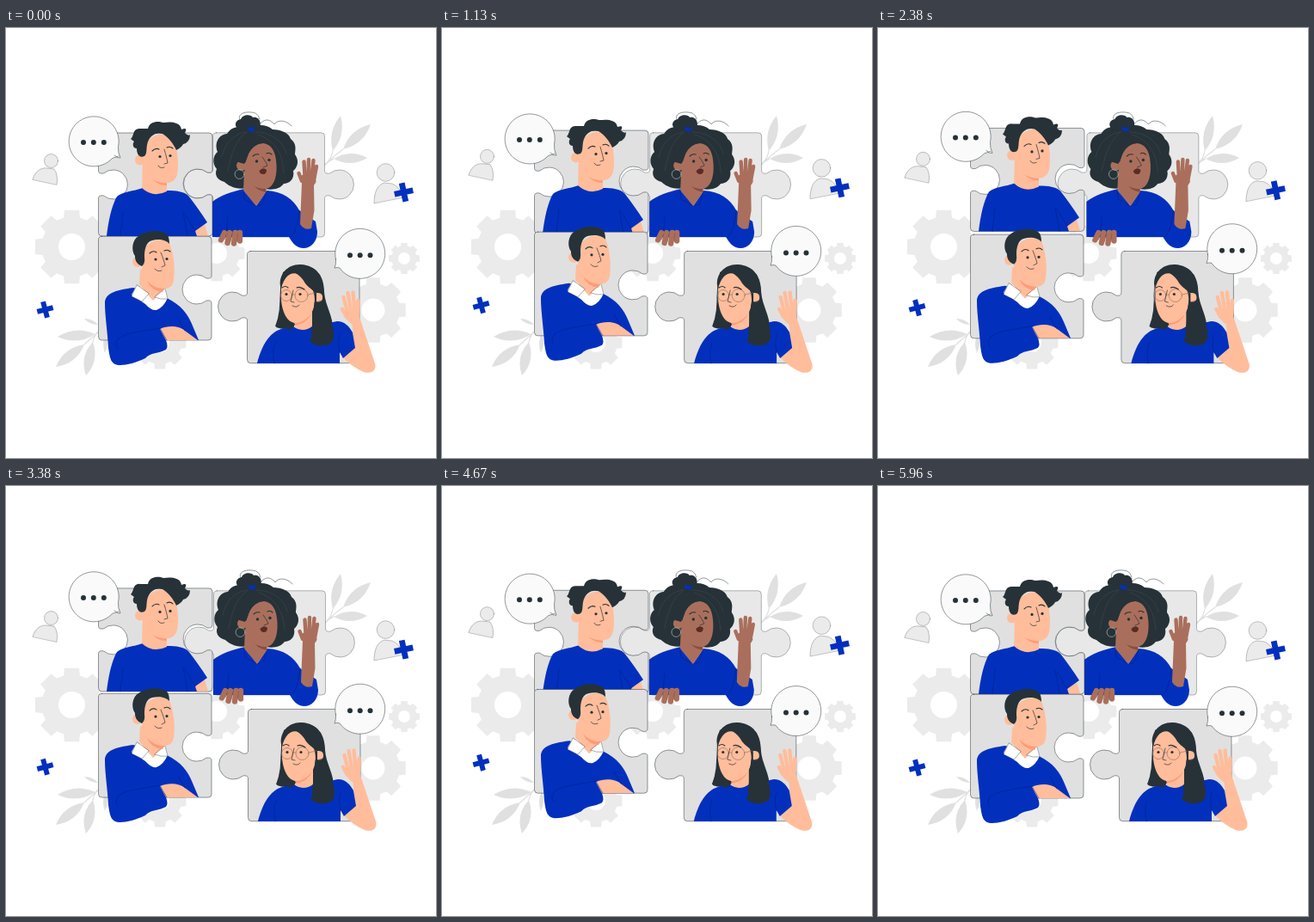
These frames come from a looping animation (500 by 500 pixels, 6 s). An HTML page:

```html
<!DOCTYPE html>
<html lang="en">
<head>
<meta charset="utf-8">
<title>Team puzzle</title>
<style>
html, body { margin: 0; width: 100%; height: 100%; overflow: hidden; background: #fff; }
svg { display: block; width: 100%; height: 100%; }
path, circle { stroke-linecap: round; stroke-linejoin: round; }
.pale { fill: #ebebeb; }
.piece { fill: #e0e0e0; stroke: #263238; stroke-width: .5; }
.light { fill: #e8e8e8; stroke-width: .35; }
.user { fill: #ebebeb; stroke: #555; stroke-width: .35; }
.bubble { fill: #fafafa; stroke: #263238; stroke-width: .5; }
.blue { fill: #0230bd; }
.plus { stroke: #0230bd; stroke-linecap: butt; }
.dark { fill: #263238; }
.skin { fill: #ffbd9b; }
.shade { fill: #ff9b78; }
.brown { fill: #aa6f5c; }
.brownShade { fill: #854f40; }
.line { fill: none; stroke: #263238; stroke-width: .7; }
.thin { stroke-width: .5; }
.brow { fill: none; stroke: #263238; stroke-width: 1.1; }
.fold { fill: none; stroke: #001c80; stroke-width: .5; }
.strand { fill: none; stroke: #47555b; stroke-width: .4; }
.fingers { fill: none; stroke: #ffbd9b; stroke-width: 4.4; }
.fingers.tan { stroke: #aa6f5c; }
.white { fill: #fff; stroke: #263238; stroke-width: .4; }
</style>
</head>
<body>
<svg viewBox="0 0 500 500">
  <g id="back" class="pale"></g>

  <g data-move="slow">
    <g class="user">
      <path d="M31 176C34 166 41 162 48 163L56 164Q61 171 59 182Z"/>
      <circle cx="52.500" cy="154.500" r="8"/>
      <path d="M428 203.500C428 191 432 182 440 180L449 181Q459 185 461 197Z"/>
      <circle cx="441.500" cy="168" r="10.300"/>
    </g>
    <path class="plus" stroke-width="6.800" transform="translate(462.500 191) rotate(-12)" d="M-11 0H11M0-11V11"/>
    <path class="plus" stroke-width="5.900" transform="translate(45.500 327.500) rotate(-15)" d="M-9.500 0H9.500M0-9.500V9.500"/>
  </g>

  <g data-move="shake">
    <path id="piece3" class="piece light"/>
    <path class="line thin" d="M272 107C268 99 280 96 290 99Q294 101 295 106M296 111C302 104 308 107 312 112C316 106 326 107 332 114"/>
    <path class="dark" d="M276 120C265 118 264 108 273 106C275 100 285 100 287 104C295 102 299 113 293 118Q286 123 276 120ZM280 186C268 189 258 183 254 179C246 177 242 171 245 164C239 157 241 148 246 144C242 134 247 124 257 123C263 113 274 114 281 117C292 111 303 112 310 118C320 118 329 122 331 129C339 135 336 143 336 147C342 155 338 163 334 166C336 176 329 181 323 181C317 189 307 188 300 187Z"/>
    <path class="strand" d="M280 121C266 122 254 134 251 150M279 122C268 130 262 144 258 166M290 121C306 121 322 130 326 146M293 124C312 130 322 146 323 168"/>
    <path class="blue" d="M281 119L282 114 286 117 290 114 288 121Z"/>
    <path class="blue" d="M240 243V202C248 195 263 190 277 187L291 207 303 189C322 190 334 199 341 212L360 225 362 237C362 249 354 256 346 256C338 256 333 250 329 243Z"/>
    <path class="brown" d="M277 166L276 189 291 207 303 190 301 180Z"/>
    <path class="brownShade" d="M284 177Q291 186 302 187L302 191Q290 189 284 177Z"/>
    <circle class="brown" cx="274" cy="160" r="6"/>
    <path class="brown" d="M278 162C279 146 288 134 299 134C308 135 313 143 314 154C316 169 313 184 303 187C291 188 281 180 277 171Z"/>
    <path class="dark" d="M277 158C281 152 281 146 285 140Q292 134 299 134L290 124 270 137 267 155Z"/>
    <circle cx="271.500" cy="170" r="5.400" fill="none" stroke="#9aa" stroke-width=".8"/>
    <path class="brow" d="M287 149Q290 146 294 147M303 146Q306 144 309 147"/>
    <circle class="dark" cx="291.500" cy="155" r="1.700"/><circle class="dark" cx="306" cy="153.500" r="1.700"/>
    <path class="line" d="M298 150Q303 157 304 160L299 162"/>
    <path fill="#5a2c26" d="M294.500 166Q299 161 303 165Q303 170 299 170Q295 170 294.500 166Z"/>
    <path class="fold" d="M276 189L277 199 291 207 298 205 303 190M331 243Q338 240 341 212M256 243L258 218"/>
    <path class="brown" d="M344 180L342 228Q347 236 355 233L358.500 212 358 182Z"/>
    <path class="brown" d="M341 174Q350 165 360 169L360.500 179Q357 187 348 186Z"/>
    <path class="fingers tan" d="M344 178L340.500 169M347.500 172L346.500 155.500M351.500 171L352 153M355.500 171L357.500 154M358.500 174L361 161"/>
    <path class="fingers tan" style="stroke-width:6.300" d="M254 238L250 246.500M260 238L257.500 250M266.500 238L265 250.500M272 238L272 247.500"/>
    <path class="line" style="stroke:#854f40;stroke-width:.6" d="M257 239L254 246M263 239L261 248M269.500 239L268.500 248"/>
  </g>

  <g data-move="fast">
    <path id="piece1" class="piece"/>
    <path class="skin" d="M217 237L231 228 235 241.500H222Z"/>
    <path class="blue" d="M117 242C119 224 123 206 129 196C136 190 148 190 159 186Q172 195 187 189C198 189 207 190 212 195C219 204 227 215 234 226L220 236 222 242Z"/>
    <path class="fold" d="M133 242L136 214M211 242L206 214M220 236L208 216"/>
    <path class="skin" d="M159 155L158 186Q171 198 187 190V176Z"/>
    <path class="shade" d="M168 173Q176 180 187 180V183Q175 183 168 173Z"/>
    <circle class="skin" cx="156" cy="153.500" r="6"/>
    <path class="skin" d="M161 140C164 122 190 118 196 132C200 144 201 160 199 170C197 179 190 181 183 180C173 179 165 174 161 166Z"/>
    <path class="dark" d="M161 149C154 152 152 145 152 140C147 140 147 134 149 132L145 129C149 126 147 116 156 117L165 117C167 108 177 108 183 110C191 109 203 109 204 118Q212 115 208 122Q212 126 214 124Q214 133 206 135Q204 139 198 142C195 135 189 127 182 123C174 121 169 125 166 130C162 137 165 146 161 149Z"/>
    <path class="brow" d="M170 143Q174 139 178 141M187 139Q191 137 194 140"/>
    <circle class="dark" cx="179" cy="149.500" r="1.600"/><circle class="dark" cx="191" cy="148.500" r="1.600"/>
    <path class="line" d="M184 141Q187 151 188 157L184 158M177 160Q179 164 184 162"/>
  </g>

  <g data-move="slow">
    <path id="piece2" class="piece"/>
    <path class="blue" d="M115 320C115 309 126 305 148 302L187 314C204 322 212 334 216 344L224 363H186Q189 371 186 374C177 379 168 377 162 384C152 389 140 392 133 392C122 392 121 385 119 372C118 352 115 335 115 320Z"/>
    <path class="skin" d="M179 350C190 345 202 347 208 352L223 363H186Z"/>
    <path class="fold" d="M131 361C140 354 157 353 179 349L187 363M131 361Q125 367 130 373M208 352L200 338"/>
    <path fill="#fff" d="M151 301L146 310 162 321Q169 329 175 328Q183 325 188 314L185 302Z"/>
    <path class="skin" d="M156 280L155 298Q162 307 171 317L184 304V290Z"/>
    <path class="white" d="M152 299L146 312 158 318 166 309ZM185 303L188 315 180 315 173 313Z"/>
    <path class="shade" d="M164 294Q172 303 184 303L182 307Q169 306 164 294Z"/>
    <circle class="skin" cx="153" cy="272" r="6"/>
    <path class="skin" d="M159 262C161 249 180 242 190 250C195 262 197 279 195 294C193 303 186 304 179 302C170 300 162 292 158 284Z"/>
    <path class="dark" d="M158 277C151 274 150 269 150 265C145 258 147 246 154 242C163 235 180 234 187 240Q190 243 190 251C186 246 177 245 170 247C162 249 161 259 161 266Q162 274 158 277Z"/>
    <path class="brow" d="M167 262Q171 258 175 261M184 259Q188 257 191 260"/>
    <circle class="dark" cx="174" cy="269" r="1.600"/><circle class="dark" cx="187" cy="268.500" r="1.600"/>
    <path class="line" d="M180 261Q184 271 185 276L181 278M173 280Q176 284 181 282"/>
  </g>

  <g data-move="shake">
    <path id="piece4" class="piece"/>
    <path class="dark" d="M319 300C317 286 328 274 343 275C361 276 370 289 370 307C371 323 381 335 380 352Q382 365 371 368Q361 371 356 365L336 346Q327 353 314 348C320 335 319 315 319 300Z"/>
    <path class="skin" d="M402 340L412 339 428 387C433 398 425 403 416 400Q402 394 391 382L405 368Z"/>
    <path class="blue" d="M292 390C297 370 306 354 320 350L334 347Q345 355 356 347L385 341C394 341 399 347 403 354L406 372 392 384 388 377V390Z"/>
    <path class="fold" d="M312 390Q309 375 313 366M388 377Q385 365 388 357"/>
    <path class="skin" d="M337 333L335 347Q345 355 356 347V325Z"/>
    <path class="shade" d="M336 341Q348 341 355 332Q350 344 335 346Z"/>
    <path class="skin" d="M320 303C321 289 330 283 341 286C352 292 362 306 358 325C354 337 344 343 336 343C326 342 321 329 320 316Z"/>
    <path class="dark" d="M319 308C321 294 327 286 335 284Q344 289 348 297C354 304 359 306 361 309C356 325 358 339 355 351Q356 360 353 364Q361 371 369 369Q377 370 381 361C382 342 372 330 370 315Q370 297 365 287L356 279 337 276 322 284Z"/>
    <path class="skin" d="M361 308Q369 307 368 315Q366 320 361 318Z"/>
    <path class="dark" d="M318 304L320 326C323 338 329 344 336 344Q332 354 326 349L313 347Q320 330 318 304Z"/>
    <circle class="line thin" cx="365.500" cy="321" r="3.500"/>
    <g class="line" style="stroke:#8d6860;stroke-width:.6"><circle cx="326" cy="311" r="6.500"/><circle cx="343.500" cy="311" r="7.500"/><path d="M332.500 310H336M351 310L360 308"/></g>
    <path class="brow" d="M321 302Q325 299 328 302M338 302Q342 300 347 304"/>
    <circle class="dark" cx="326" cy="309.500" r="1.600"/><circle class="dark" cx="342" cy="309.500" r="1.600"/>
    <path class="line" d="M334 305L331 318 335 319M333 323Q338 326 341 322"/>
    <path class="skin" d="M392 331Q398 323 409 327L412 341 403 345Q396 341 392 331Z"/>
    <path class="fingers" d="M396 336L391 327M396.500 329L392.500 313M401 328L397.500 308M405.500 328L403.500 307.500M409 332L409.500 317"/>
  </g>

  <g data-move="fast">
    <path class="bubble" d="M131 149L123.500 151.500A29 29 0 1 1 130.500 138Q130 145 133 151Q130 152 126 148"/>
    <path class="bubble" d="M383.500 269A29 29 0 1 1 388 279Q385 278 382 279Q384 275 383.500 269Z"/>
    <g class="dark">
      <circle cx="90" cy="133" r="3"/><circle cx="101.800" cy="133" r="3"/><circle cx="113.800" cy="133" r="3"/>
      <circle cx="400" cy="264.300" r="3"/><circle cx="411.700" cy="264.300" r="3"/><circle cx="423.500" cy="264.300" r="3"/>
    </g>
  </g>
</svg>
<script>
const TAU = 2 * Math.PI;

// One vertical puzzle side: x, centre y, bulge direction, travel direction.
const side = (x, c, d, v) =>
  `L${x} ${c - 16 * v}q0 ${4 * v} ${6 * d} ${3 * v}` +
  `a17 17 0 1 ${d * v > 0 ? 1 : 0} 0 ${26 * v}q${-6 * d} ${-v} ${-6 * d} ${3 * v}`;

function piece(id, l, t, r, b, left, right) {
  const d = `M${l + 4} ${t}H${r - 4}q4 0 4 4` + (right ? side(r, ...right, 1) : '') +
    `V${b - 4}q0 4 -4 4H${l + 4}q-4 0 -4 -4` + (left ? side(l, ...left, -1) : '') +
    `V${t + 4}q0 -4 4 -4Z`;
  document.getElementById(id).setAttribute('d', d);
}
piece('piece1', 107.5, 122, 240, 242, [182, 1], [181, -1]);
piece('piece2', 107.5, 242.3, 239, 363, null, [304, -1]);
piece('piece3', 240.5, 121.8, 370.5, 243, [181, -1], [182, 1]);
piece('piece4', 280.5, 259.5, 411, 389.7, [324, -1], null);

function gear(x, y, r, hole) {
  const pts = [];
  for (let i = 0; i < 8; i++)
    for (const [k, a] of [[.81, -.27], [1, -.2], [1, .2], [.81, .27]]) {
      const ang = i * TAU / 8 + a;
      pts.push(`${x + r * k * Math.cos(ang)} ${y + r * k * Math.sin(ang)}`);
    }
  return `<path d="M${pts.join('L')}Z"/><circle cx="${x}" cy="${y}" r="${hole}" fill="#fff"/>`;
}

function leaf(x1, y1, x2, y2, w) {
  const len = Math.hypot(x2 - x1, y2 - y1);
  const px = (y1 - y2) / len * w, py = (x2 - x1) / len * w;
  const mx = (x1 + x2) / 2, my = (y1 + y2) / 2;
  return `<path d="M${x1} ${y1}Q${mx + px} ${my + py} ${x2} ${y2}Q${mx - px} ${my - py} ${x1} ${y1}"/>`;
}

const stem = d => `<path d="${d}" fill="none" stroke="#e0e0e0" stroke-width="1.3"/>`;

document.getElementById('back').innerHTML =
  [[76.5, 254.5, 43.5, 15.5], [427, 328, 38.5, 13.5], [463, 268, 18.3, 7],
   [245, 262, 33, 12], [179, 366, 31, 11]].map(g => gear(...g)).join('') +
  '<g fill="#e0e0e0">' +
  [[380, 143, 389, 102, 11], [392, 141, 424, 112, 12], [381, 152, 420, 151, 11],
   [104, 356, 60, 359, 12], [91, 368, 58, 394, 12], [101, 365, 93, 404, 12],
   [116, 355, 115, 378, 5], [107, 345, 91, 338, 4]].map(l => leaf(...l)).join('') + '</g>' +
  stem('M366 166Q374 154 392 141M373 157Q379 150 380 143M371 158L381 152') +
  stem('M124 340Q105 355 91 368M104 356L115 347M101 365Q102 359 106 354');

const ease = u => (1 - Math.cos(Math.PI * u)) / 2;
const bob = (t, period) => -6 * ease(2 * t / period);
const shakeKeys = [0, -1, 2, -4, 4, -4, 4, -4, 2, -1, 0];

function shake(t) {
  const p = t / 600, i = Math.floor(p);
  const a = shakeKeys[i], b = shakeKeys[i + 1];
  return .6 * (a + (b - a) * ease(p - i));
}

const moves = {
  fast: t => [0, bob(t, 1500)],
  slow: t => [0, bob(t, 3000)],
  shake: t => [shake(t), 0]
};
const groups = [...document.querySelectorAll('[data-move]')];
const start = performance.now();

function frame() {
  const t = (performance.now() - start) % 6000;
  for (const g of groups)
    g.setAttribute('transform', `translate(${moves[g.dataset.move](t)})`);
  requestAnimationFrame(frame);
}
frame();
</script>
</body>
</html>
```
